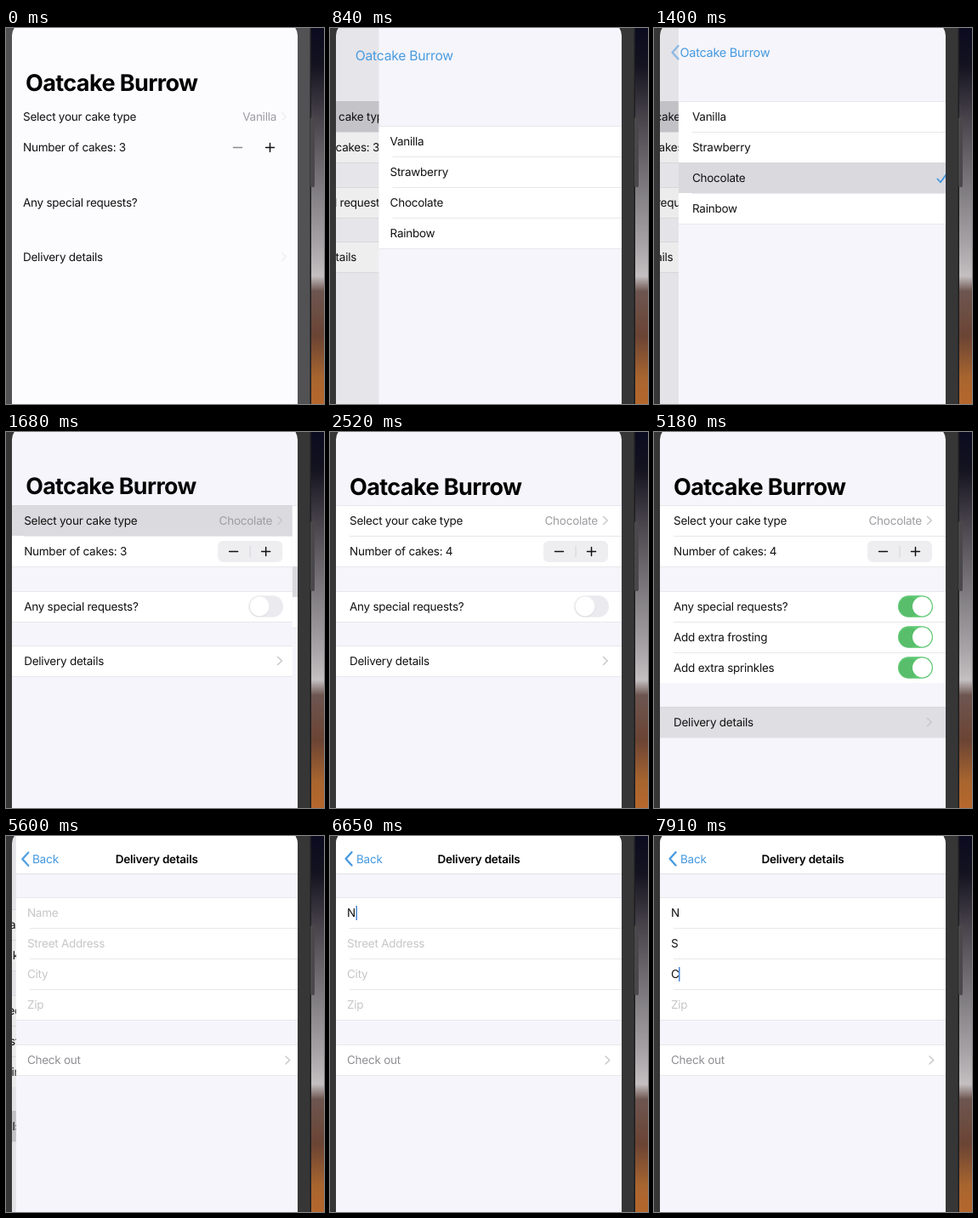
Recreate the animation shown at these times as an HTML page. Size 374 by 442 pixels, loop 8000 ms.

```html
<!DOCTYPE html>
<html lang="en">
<head>
<meta charset="utf-8">
<title>Order form</title>
<style>
html, body { margin: 0; width: 100%; height: 100%; overflow: hidden; background: #333; }
svg { display: block; width: 374px; height: 442px; }
text { font: 400 13.5px Inter, Roboto, sans-serif; letter-spacing: -.25px; fill: #111; text-rendering: geometricPrecision; }
.large { font-size: 27px; font-weight: 700; letter-spacing: -.6px; fill: #000; }
.bar { font-weight: 600; fill: #000; }
.value { fill: #9d9ca1; }
.off { fill: #8f8f93; }
.hint { fill: #c6c6c9; }
.tint { fill: #4599df; }
.line { fill: none; stroke-linecap: round; stroke-linejoin: round; }
</style>
</head>
<body>
<svg id="stage" viewBox="0 0 374 442">
  <defs>
    <linearGradient id="photo" x1="0" y1="0" x2="0" y2="1">
      <stop offset="0" stop-color="#0b0b20"/>
      <stop offset=".1" stop-color="#14131f"/>
      <stop offset=".24" stop-color="#48434b"/>
      <stop offset=".45" stop-color="#858286"/>
      <stop offset=".57" stop-color="#a5a1a4"/>
      <stop offset=".66" stop-color="#c4bfc1"/>
      <stop offset=".7" stop-color="#6d5650"/>
      <stop offset=".82" stop-color="#6b4434"/>
      <stop offset=".93" stop-color="#a8652f"/>
      <stop offset="1" stop-color="#b5672c"/>
    </linearGradient>
    <clipPath id="screen"><rect x="7" y="-7" width="336" height="480" rx="16"/></clipPath>
    <clipPath id="extraClip"><rect id="extraBox" x="7" y="223" width="336" height="0"/></clipPath>
  </defs>
</svg>
<script>
const LOOP = 8000, STEP = 70, NAME = "Oatcake Burrow";
const BG = "#f6f5fb", LINE = "#e8e7eb", BLUE = "#4599df";
const stage = document.getElementById("stage");
const extraBox = document.getElementById("extraBox");

function add(parent, tag, attrs, text) {
  const el = document.createElementNS("http://www.w3.org/2000/svg", tag);
  set(el, attrs || {});
  if (text) el.textContent = text;
  return parent.appendChild(el);
}
function set(el, attrs) {
  for (const k in attrs) el.setAttribute(k, attrs[k]);
}
const group = (parent, attrs) => add(parent, "g", attrs);
const box = (parent, x, y, width, height, fill, rx = 0) =>
  add(parent, "rect", { x, y, width, height, fill, rx });
const label = (parent, x, y, text, cls = "", anchor = "start") =>
  add(parent, "text", { x, y, class: cls, "text-anchor": anchor }, text);
const stroke = (parent, d, color, width) =>
  add(parent, "path", { d, class: "line", stroke: color, "stroke-width": width });
const chevron = (parent, x, y) => stroke(parent, `M${x} ${y - 4.5}l4.8 4.5l-4.8 4.5`, "#c6c6ca", 1.4);
const move = (el, x, y = 0) => el.setAttribute("transform", `translate(${x} ${y})`);
const show = (el, on) => el.setAttribute("opacity", +on);

// A block of white table rows with hairlines.
function section(parent, y, count) {
  box(parent, 7, y, 336, count * 36, "#fff");
  for (let i = 0; i <= count; i++) {
    const x = i % count ? 23 : 7;
    box(parent, x, y + i * 36, 343 - x, 1, LINE);
  }
}
function toggle(parent, y) {
  const g = group(parent);
  box(g, 287, y - 12.7, 41, 25.4, "#ebebef", 12.7);
  const green = box(g, 287, y - 12.7, 41, 25.4, "#5eca72", 12.7);
  add(g, "circle", { cx: 300, cy: y + .8, r: 11.8, fill: "#000", opacity: .06 });
  const knob = add(g, "circle", { cx: 300, cy: y, r: 11.4, fill: "#fff" });
  return {
    g,
    at(ms) {
      knob.setAttribute("cx", 300 + 15.4 * smooth(ms / 230));
      show(green, clamp((ms - 70) / 320));
    }
  };
}

const clamp = v => Math.min(1, Math.max(0, v));
const smooth = v => (v = clamp(v), v * v * (3 - 2 * v));
function spring(ms) {
  const x = Math.max(0, ms) * .0197;
  return 1 - (1 + x) * Math.exp(-x);
}

// Surroundings
box(stage, 358, 0, 16, 442, "url(#photo)");
const bezel = box(stage, 0, 0, 358, 442, "#363637");
box(stage, 357.5, 0, 1.5, 442, "#1f1e20");
box(stage, 358, 105, 5, 82, "#4a484b", 1.5);
const screen = group(stage, { "clip-path": "url(#screen)" });

// Order form
const form = group(screen);
const formBg = box(form, 7, 0, 336, 442, BG);
const cells = group(form);
section(cells, 86, 2);
section(cells, 187, 1);
const press = box(cells, 7, 86, 336, 36, "#d2d1d6");

const labels = group(form);
label(labels, 23, 109, "Select your cake type");
const count = label(labels, 23, 145, "Number of cakes: 3");
label(labels, 23, 209.5, "Any special requests?");

const right = group(form);
const kind = label(right, 315, 109, "Vanilla", "value", "end");
const arrow = chevron(right, 321.5, 104);
const stepBg = group(right);
box(stepBg, 251, 128, 76, 25, "#eeeef1", 6);
const plusPress = box(stepBg, 289, 128, 38, 25, "#d9d9dd", 6);
box(stepBg, 288.5, 134, 1, 13, "#d3d3d7");
const minus = stroke(right, "M264.5 140.5h10", "#111", 1.5);
stroke(right, "M302.5 140.5h10m-5 -5v10", "#111", 1.5);
const special = toggle(form, 205);

const extra = group(form, { "clip-path": "url(#extraClip)" });
box(extra, 7, 223, 336, 72, "#fff");
box(extra, 23, 223, 320, 1, LINE);
box(extra, 23, 259, 320, 1, LINE);
const extraIn = group(extra);
label(extraIn, 23, 245.5, "Add extra frosting");
label(extraIn, 23, 281.5, "Add extra sprinkles");
const frosting = toggle(extraIn, 241);
const sprinkles = toggle(extraIn, 277);

const delivery = group(form);
const deliveryCell = group(delivery);
section(deliveryCell, 251, 1);
const deliveryPress = box(delivery, 7, 251, 336, 36, "#d2d1d6");
const deliveryText = label(delivery, 23, 273.5, "Delivery details");
const deliveryArrow = chevron(delivery, 321.5, 269);

const dim = box(screen, 7, 0, 336, 442, "#000");

// Cake list
const list = group(screen);
box(list, 7, 0, 336, 442, BG);
const rows = group(list);
section(rows, 86, 4);
const picked = box(rows, 7, 158, 336, 36, "#dad9de");
const names = group(rows);
["Vanilla", "Strawberry", "Chocolate", "Rainbow"].forEach((s, i) => label(names, 23, 109 + i * 36, s));
const tick = group(rows);
stroke(tick, "M311.5 105.5l3.6 3.8l7 -9.6", BLUE, 1.8);

// Delivery page
const details = group(screen);
box(details, 7, 0, 336, 442, BG);
box(details, 7, 0, 336, 44, "#fff");
box(details, 7, 44, 336, 1, "#e3e2e6");
section(details, 72, 4);
section(details, 245, 1);
const fields = ["Name", "Street Address", "City", "Zip"].map((hint, i) =>
  ({ hint, el: label(details, 20, 95 + i * 36, hint, "hint") }));
label(details, 20, 268, "Check out", "off");
chevron(details, 324, 263.5);
const caret = box(details, 0, 0, 1.5, 17, "#4b86d8");

// Navigation bar
const large = label(screen, 0, 0, NAME, "large");
const back = label(screen, 0, 0, NAME, "tint");
const backArrow = stroke(screen, "M25.6 19l-7 7.7l7 7.7", BLUE, 2.3);
const heading = label(screen, 175, 31.5, "Delivery details", "bar", "middle");

const typed = [[6580, "N"], [7210, "S"], [7770, "C"]];
// time, x, row
const caretSteps = [[6230, 20, 0], [6580, 30.5, 0], [6790, 20, 1], [7210, 29, 1], [7350, 20, 2], [7770, 29, 2]];

function drawForm(t) {
  const pale = t < 490;
  const pressed = t < 1400 ? clamp((t - 420) / 100) : 1 - smooth((t - 1560) / 400);
  formBg.setAttribute("fill", pale ? "#fcfbfe" : BG);
  bezel.setAttribute("fill", pale ? "#525254" : "#363637");
  [cells, stepBg, special.g, deliveryCell].forEach(el => show(el, !pale));
  [arrow, deliveryArrow].forEach(el => show(el, pale ? .25 : 1));
  [labels, deliveryText].forEach(el => move(el, pale ? -3 : 0));
  [right, deliveryArrow].forEach(el => move(el, pale ? 3 : 0));
  minus.setAttribute("stroke", pale ? "#8b8b8b" : "#111");
  show(press, pale ? 0 : pressed);

  kind.textContent = t < 1400 ? "Vanilla" : "Chocolate";
  count.textContent = "Number of cakes: " + (t < 2380 ? 3 : 4);
  show(plusPress, t >= 2380 && t < 2520);

  special.at(t - 2940);
  frosting.at(t - 3710);
  sprinkles.at(t - 4480);
  const open = smooth((t - 3080) / 380);
  extraBox.setAttribute("height", 72 * open);
  show(extraIn, open);
  move(delivery, 0, 72 * open);
  show(deliveryPress, clamp((t - 5110) / 100));
}

function drawList(t, p) {
  const settle = smooth((t - 1050) / 210);
  const chosen = t >= 1400;
  show(list, p > .001);
  move(list, 336 * (1 - p));
  move(rows, 0, 29 * (1 - settle));
  move(names, -3 * (1 - settle));
  show(picked, chosen);
  move(tick, 0, chosen ? 72 : 0);
}

function drawDetails(t, p) {
  show(details, p > .001);
  move(details, 336 * (1 - p));
  fields.forEach(({ hint, el }, i) => {
    const done = typed[i] && t >= typed[i][0];
    el.textContent = done ? typed[i][1] : hint;
    el.setAttribute("class", done ? "" : "hint");
  });
  const now = caretSteps.filter(s => t >= s[0]).pop();
  show(caret, !!now);
  if (now) set(caret, { x: now[1], y: 82 + now[2] * 36 });
}

function drawBar(p, second) {
  const x = 23 + 8 * p, y = 74 - 42.5 * p;
  const place = (el, s) => el.setAttribute("transform", `translate(${x} ${y}) scale(${s})`);
  place(large, 1 - .525 * p);
  place(back, 2.1 - 1.1 * p);
  show(large, clamp(1 - 1.3 * p));
  show(back, clamp(1.15 * p));
  back.textContent = second ? "Back" : NAME;
  move(backArrow, 45 * (1 - p), 30 * (1 - p));
  show(backArrow, clamp((p - .85) / .15));
  move(heading, 150 * (1 - p));
  show(heading, second ? p : 0);
}

function draw(t) {
  const p1 = t < 1379 ? spring(t - 669) : 1 - spring(t - 1379);
  const p2 = spring(t - 5285);
  const p = Math.max(p1, p2);
  drawForm(t);
  move(form, -101 * p);
  show(dim, .08 * p);
  drawList(t, p1);
  drawDetails(t, p2);
  drawBar(p, t > 5285);
}

const start = performance.now();
function tick60(now) {
  const t = Math.max(0, now - start) % LOOP;
  draw(Math.floor(t / STEP) * STEP);
  requestAnimationFrame(tick60);
}
draw(0);
requestAnimationFrame(tick60);
</script>
</body>
</html>
```
